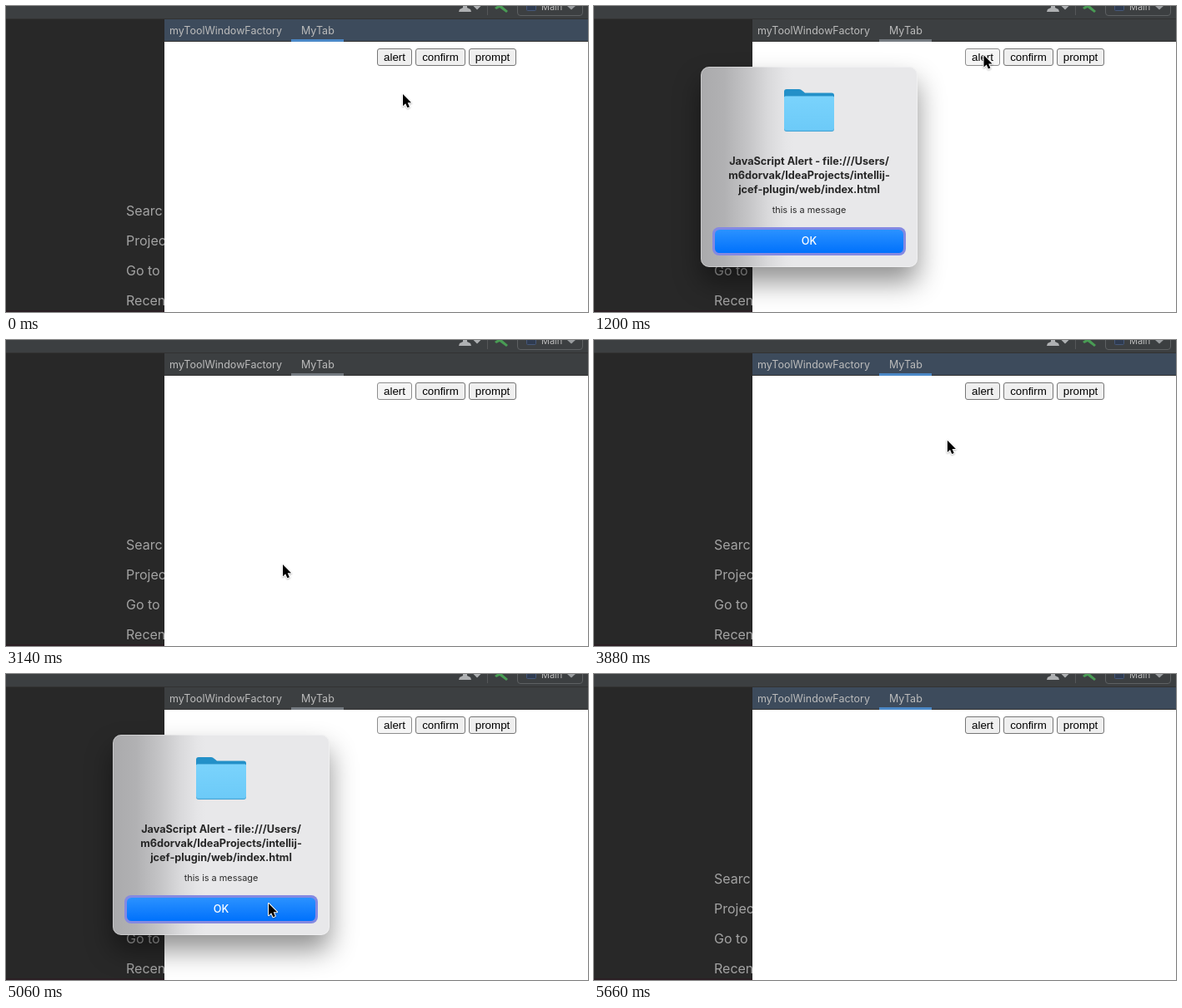
Recreate the animation shown at these times as an HTML page with a canvas. Size 698 by 368 pixels, loop 6410 ms.

```html
<!DOCTYPE html>
<html lang="en">
<head>
<meta charset="utf-8">
<title>Tool window dialogs</title>
<style>
  html, body { margin: 0; width: 100%; height: 100%; overflow: hidden; background: #fff; }
  canvas { display: block; }
</style>
</head>
<body>
<canvas id="stage" width="698" height="368"></canvas>
<script>
const W = 698, H = 368, LOOP = 6410;
const UI = 'Inter, "Open Sans", sans-serif';
const FORM = '"Liberation Sans", Arial, sans-serif';
const CENTER = { x: 258, y: 193.5 };
const stage = document.getElementById('stage').getContext('2d');

// Cursor moves: first change, last change, number of changes, end point.
const START = [476, 106];
const MOVES = [
  [150, 600, 4, [467.5, 59.3]],
  [1500, 2240, 6, [332, 270]],
  [3290, 4030, 6, [456, 68.5]],
  [4480, 5060, 5, [315, 276]],
  [5510, 5510, 1, [387, 305]]
];
const CURSOR_GONE = 5660;

const within = (t, a, b) => t >= a && t < b;
const ease = u => u * u * (3 - 2 * u);

function layer(draw) {
  const c = document.createElement('canvas');
  c.width = W;
  c.height = H;
  draw(c.getContext('2d'));
  return c;
}

function rect(g, color, x, y, w, h) {
  g.fillStyle = color;
  g.fillRect(x, y, w, h);
}

function round(g, x, y, w, h, r) {
  g.beginPath();
  g.roundRect(x, y, w, h, r);
}

function poly(g, color, points) {
  g.beginPath();
  points.forEach(([x, y]) => g.lineTo(x, y));
  g.closePath();
  g.fillStyle = color;
  g.fill();
}

function text(g, str, x, y, font, color, align = 'left') {
  g.font = font;
  g.fillStyle = color;
  g.textAlign = align;
  g.fillText(str, x, y);
}

function gradient(g, x0, y0, x1, y1, stops) {
  const fill = g.createLinearGradient(x0, y0, x1, y1);
  stops.forEach(([at, color]) => fill.addColorStop(at, color));
  return fill;
}

function paintToolbar(g) {
  rect(g, '#3c3f41', 0, 0, W, 15);
  rect(g, '#323232', 0, 15, W, 1);
  // user icon with its arrow
  poly(g, '#afb1b3', [[543, 7], [544, 4], [548, 2], [548, 0], [553, 0], [553, 2], [557, 4], [558, 7]]);
  poly(g, '#afb1b3', [[560.5, 0], [569.5, 0], [565, 4.5]]);
  rect(g, '#555759', 577, 0, 1, 11);
  // hammer
  poly(g, '#499c54', [[586, 2], [589, 0], [595, 0], [602, 6], [600, 8], [592, 2], [588, 4]]);
  // run configuration box
  round(g, 613.5, -8.5, 78, 20, 3.5);
  g.strokeStyle = '#5e6163';
  g.lineWidth = 1;
  g.stroke();
  round(g, 624.5, -5.5, 11, 11, 1);
  g.fillStyle = '#2f3b50';
  g.fill();
  g.strokeStyle = '#46587a';
  g.stroke();
  text(g, 'Main', 642, 5, '11px ' + UI, '#bbbbbb');
  poly(g, '#9a9da0', [[673, 0], [683, 0], [678, 4.5]]);
}

function paintBackdrop(g) {
  rect(g, '#ffffff', 0, 0, W, H);
  rect(g, '#282828', 0, 16, 190, H - 16);
  rect(g, '#2b1f24', 0, 366, 190, 2);
  g.save();
  g.beginPath();
  g.rect(0, 16, 190, H);
  g.clip();
  ['Searc', 'Projec', 'Go to', 'Recen'].forEach((word, i) =>
    text(g, word, 144, 252 + 36 * i, '16px ' + UI, '#a3a3a3'));
  g.restore();
  paintToolbar(g);
}

function paintHeader(g, active) {
  rect(g, active ? '#3d4b5c' : '#3c3f41', 190, 16, W - 190, 26);
  rect(g, '#323232', 190, 42, W - 190, 1);
  rect(g, active ? '#4a88c7' : '#747a80', 342, 40, 63, 3);
  const font = '12.5px ' + UI;
  text(g, 'myToolWindowFactory', 196, 34, font, '#bbbbbb');
  text(g, 'MyTab', 354, 34, font, '#bbbbbb');
}

const LOOKS = {
  normal: ['#efefef', '#767676'],
  hover: ['#e5e5e5', '#4f4f4f'],
  pressed: ['#f5f5f5', '#8d8d8d']
};

function paintButton(g, label, x, w, look = 'normal') {
  const [fill, border] = LOOKS[look];
  round(g, x + 0.5, 51.5, w - 1, 20, 2.5);
  g.fillStyle = fill;
  g.fill();
  g.strokeStyle = border;
  g.lineWidth = 1;
  g.stroke();
  text(g, label, x + w / 2, 66, '13.333px ' + FORM, '#000000', 'center');
}

function paintFolder(g) {
  g.beginPath();
  g.moveTo(228, 112);
  g.lineTo(228, 103);
  g.quadraticCurveTo(228, 100, 231, 100);
  g.lineTo(246, 100);
  g.quadraticCurveTo(248, 100, 250, 102);
  g.lineTo(253, 104.5);
  g.lineTo(285, 104.5);
  g.quadraticCurveTo(288, 104.5, 288, 107.5);
  g.lineTo(288, 114);
  g.closePath();
  g.fillStyle = '#2390c8';
  g.fill();
  round(g, 228, 108.5, 60, 42.5, [1.5, 1.5, 3, 3]);
  g.fillStyle = '#4aa6d6';
  g.fill();
  round(g, 228, 108.5, 60, 41.3, [1.5, 1.5, 3, 3]);
  g.fillStyle = gradient(g, 0, 108, 0, 150, [[0, '#7ad3fc'], [1, '#6ccaf8']]);
  g.fill();
}

function paintDialog(g, scale) {
  g.translate(CENTER.x, CENTER.y);
  g.scale(scale, scale);
  g.translate(-CENTER.x, -CENTER.y);

  // The dark panel behind tints the left side, whatever the dialog's size.
  const behind = x => CENTER.x + (x - CENTER.x) / scale;
  g.save();
  g.shadowColor = 'rgba(0,0,0,.43)';
  g.shadowBlur = 32 * scale;
  g.shadowOffsetY = 18 * scale;
  round(g, 128, 73, 260, 241, 10);
  g.fillStyle = gradient(g, behind(128), 0, behind(240), 0, [
    [0, '#aaaaac'], [0.25, '#b1b1b3'], [0.5, '#c4c4c6'],
    [0.72, '#d9d9db'], [0.9, '#e5e5e7'], [1, '#e8e8ea']
  ]);
  g.fill();
  g.restore();
  round(g, 128.5, 73.5, 259, 240, 9.5);
  g.strokeStyle = 'rgba(255,255,255,.35)';
  g.lineWidth = 1;
  g.stroke();

  paintFolder(g);
  [
    'JavaScript Alert - file:///Users/',
    'm6dorvak/IdeaProjects/intellij-',
    'jcef-plugin/web/index.html'
  ].forEach((line, i) =>
    text(g, line, 258, 191 + 17 * i, 'bold 12.7px ' + UI, '#262626', 'center'));
  text(g, 'this is a message', 258, 249, '10.9px ' + UI, '#2a2a2a', 'center');

  round(g, 142, 266, 232, 34, 8);
  g.fillStyle = '#8489e2';
  g.fill();
  round(g, 145, 269, 226, 28, 5.5);
  g.fillStyle = gradient(g, 0, 269, 0, 297, [[0, '#2b92ff'], [1, '#0071fc']]);
  g.fill();
  text(g, 'OK', 258, 287, '500 12.7px ' + UI, '#ffffff', 'center');
}

function paintCursor(g, [x, y]) {
  g.save();
  g.translate(x, y);
  const shape = new Path2D('M0 0V14.2L3.2 11.3L5.4 16.3L7.9 15.2L5.7 10.3H10.1Z');
  g.lineJoin = 'round';
  g.lineWidth = 2;
  g.strokeStyle = '#ffffff';
  g.shadowColor = 'rgba(0,0,0,.3)';
  g.shadowBlur = 2;
  g.shadowOffsetY = 0.8;
  g.stroke(shape);
  g.shadowColor = 'transparent';
  g.fillStyle = '#000000';
  g.fill(shape);
  g.restore();
}

function cursorAt(t) {
  let pos = START;
  for (const [from, to, count, end] of MOVES) {
    if (t < from) break;
    const gap = count > 1 ? (to - from) / (count - 1) : 1;
    const step = Math.min(count, Math.floor((t - from) / gap + 1e-6) + 1);
    const u = ease(step / count), [x, y] = pos;
    pos = [x + (end[0] - x) * u, y + (end[1] - y) * u];
  }
  return pos;
}

function alertLook(t, [x, y]) {
  if (within(t, 750, 3290) || within(t, 4180, 5510)) return 'pressed';
  return x > 445 && x < 487 && y > 51 && y < 72 ? 'hover' : 'normal';
}

const backdrop = layer(paintBackdrop);
const dialogs = [
  { from: 1050, to: 1200, scale: 0.26, alpha: 0.3 },
  { from: 1200, to: 3140, scale: 1, alpha: 1 },
  { from: 4330, to: 4480, scale: 0.685, alpha: 0.7 },
  { from: 4480, to: 5360, scale: 1, alpha: 1 }
].map(d => ({ ...d, image: layer(g => paintDialog(g, d.scale)) }));

function draw(t) {
  const g = stage;
  const cursor = cursorAt(t);
  g.drawImage(backdrop, 0, 0);
  paintHeader(g, !within(t, 1200, 3290) && !within(t, 4330, 5510));
  paintButton(g, 'alert', 445, 42, alertLook(t, cursor));
  paintButton(g, 'confirm', 491, 60);
  paintButton(g, 'prompt', 555, 57);

  const dialog = dialogs.find(d => within(t, d.from, d.to));
  if (dialog) {
    g.globalAlpha = dialog.alpha;
    g.drawImage(dialog.image, 0, 0);
    g.globalAlpha = 1;
  }
  if (t < CURSOR_GONE) paintCursor(g, cursor);
}

let start;
function tick(now) {
  start ??= now;
  draw((now - start) % LOOP);
  requestAnimationFrame(tick);
}
draw(0);
requestAnimationFrame(tick);
</script>
</body>
</html>
```
